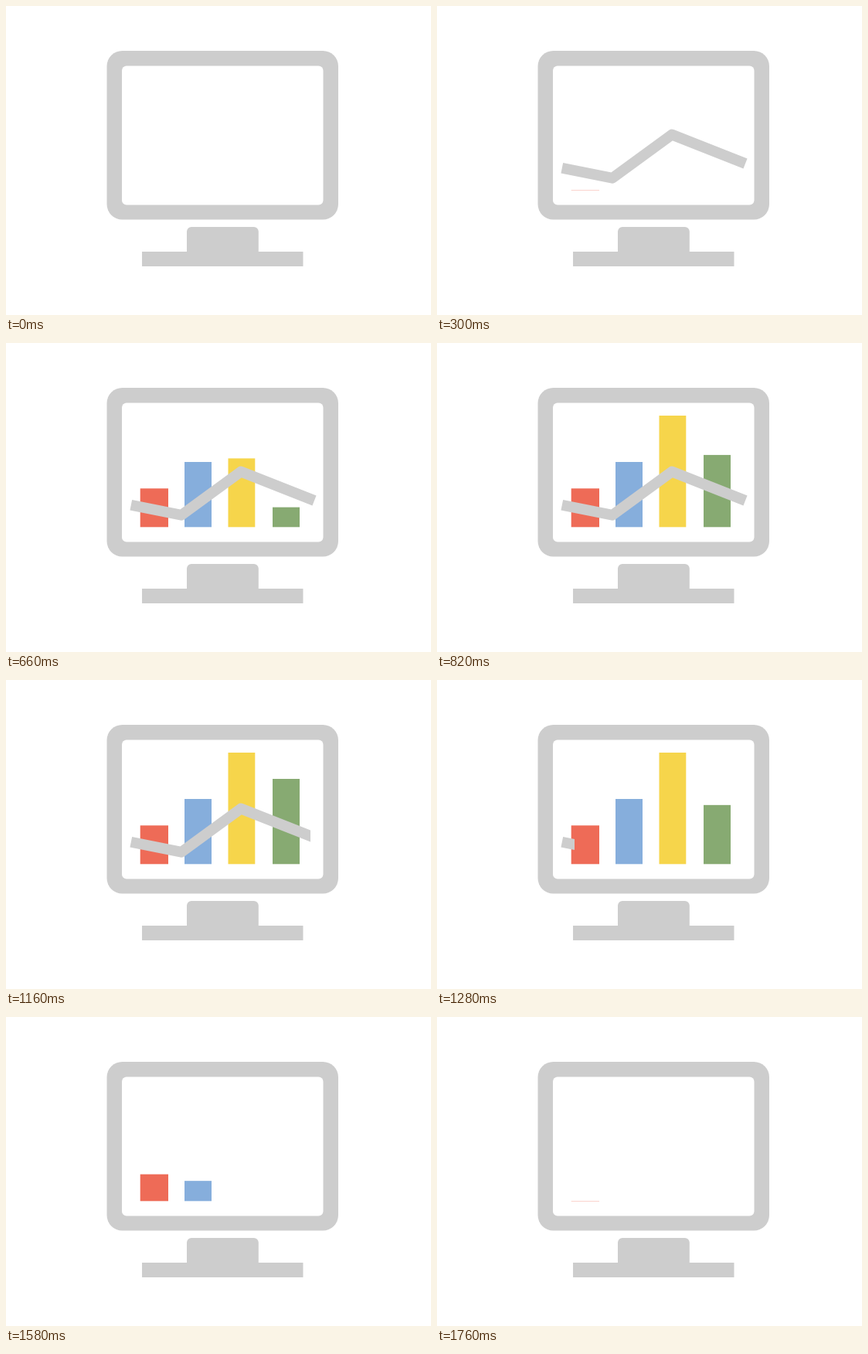
Recreate the animation shown at these times as an HTML page with a canvas. Size 550x400 px, loop 1780 ms.

```html
<!DOCTYPE html>
<html lang="en">
<head>
<meta charset="utf-8">
<title>Chart on a monitor</title>
<style>
  html, body { margin: 0; width: 100%; height: 100%; overflow: hidden; background: #fff; }
  canvas { display: block; }
</style>
</head>
<body>
<canvas id="stage" width="550" height="400"></canvas>
<script>
const ctx = document.getElementById('stage').getContext('2d');
const LOOP = 1780, STEP = 20, GROW = 260, FLOOR = 238;
const GRAY = '#cdcdcd';

// Bars start growing 100 ms apart.
const bars = [
  { x: 173.7, w: 36.3, h: 49.7, color: '#ee6b57' },
  { x: 231, w: 35, h: 84, color: '#86aedc' },
  { x: 287.5, w: 34.8, h: 144, color: '#f6d54b' },
  { x: 345, w: 35, h: 110, color: '#87aa72' }
];

function box(x, y, w, h, radius, color) {
  ctx.fillStyle = color;
  ctx.beginPath();
  ctx.roundRect(x, y, w, h, radius);
  ctx.fill();
}

function drawMonitor() {
  box(130.5, 58, 299.5, 218.5, 20, GRAY);
  box(150, 77.5, 260.5, 180, 6, '#fff');
  box(234, 286, 92.8, 33, [6, 6, 0, 0], GRAY);
  box(176, 318, 208.5, 19, 0, GRAY);
}

function drawBars(time) {
  bars.forEach((bar, i) => {
    const p = Math.min(1, (time - 300 - i * 100) / GROW);
    if (p < 0) return;
    const h = bar.h * p;
    ctx.fillStyle = bar.color;
    ctx.fillRect(bar.x, FLOOR - h, bar.w, h + 0.3);
  });
}

// The line is wiped in from the left.
function drawLine(time) {
  const edge = 394 + (time - 180) * 1.8;
  if (edge <= 150) return;
  ctx.save();
  ctx.beginPath();
  ctx.rect(150, 78, edge - 150, 179);
  ctx.clip();
  ctx.beginPath();
  ctx.moveTo(161.8, 209.8);
  ctx.lineTo(227, 222.8);
  ctx.lineTo(304, 166.5);
  ctx.lineTo(399, 204);
  ctx.lineWidth = 13.8;
  ctx.lineJoin = 'round';
  ctx.strokeStyle = GRAY;
  ctx.stroke();
  ctx.restore();
}

function frame(now) {
  const t = Math.floor(now % LOOP / STEP) * STEP;
  ctx.clearRect(0, 0, 550, 400);
  drawMonitor();
  // Both parts run backwards in the second half.
  drawBars(t < 1200 ? t : 2060 - t);
  drawLine(t < 1160 ? t : 1340 - t);
  requestAnimationFrame(frame);
}

requestAnimationFrame(frame);
</script>
</body>
</html>
```
